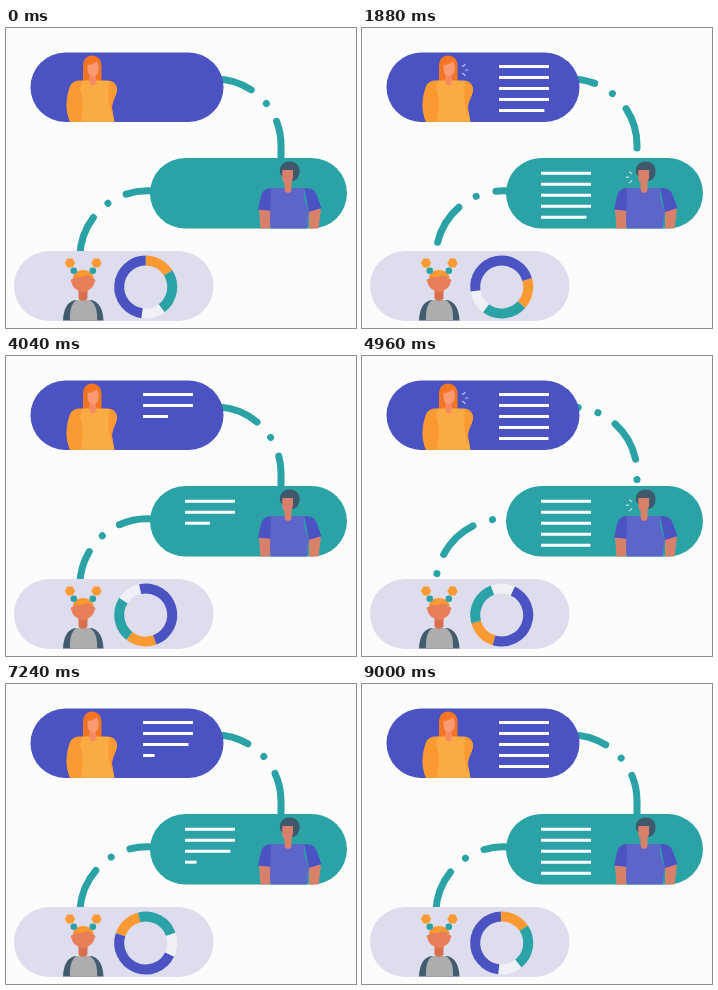
Write an HTML page that moves like this. It is 350 px wide and 300 px high and loops after 9.04 s.

```html
<!DOCTYPE html>
<html lang="en">
<head>
<meta charset="utf-8">
<title>Connected cards</title>
<style>
  html, body { margin: 0; width: 100%; height: 100%; overflow: hidden; background: #fcfcfc; }
  svg { display: block; width: 100vw; height: 100vh; }
  .link { fill: none; stroke: #2ba3a6; stroke-width: 7; stroke-linecap: round; stroke-dasharray: .01 20.4 41.5 20.4; }
  .line { stroke: #fff; stroke-width: 3; }
  .voice { fill: none; stroke-width: 1.2; stroke-linecap: round; }
</style>
</head>
<body>
<svg viewBox="0 0 350 300" xmlns="http://www.w3.org/2000/svg">
  <path class="link" id="upper" d="M197.5 52A66 66 0 0 1 275 117V142"/>
  <path class="link" id="lower" d="M152.7 163.8A67.2 67.2 0 0 0 73.8 230V242"/>

  <rect x="24.5" y="24.5" width="193" height="69.5" rx="34.7" fill="#4b52c1"/>
  <rect x="144" y="130" width="197" height="70.5" rx="35.2" fill="#2ba3a6"/>
  <rect x="8" y="223" width="199.5" height="70" rx="35" fill="#dddded"/>

  <!-- woman, top card -->
  <path fill="#f47521" d="M77 53V38C77 31 81 27.5 86 27.5S95.500 31 95.500 38V53Z"/>
  <path fill="#fb9a33" d="M76 52.500C69 52 65 54 63 61C60 71 59 83 64 94H80Z"/>
  <path fill="#fbab44" d="M76 52.500H101C107 52.500 111 57 111 62C110 69 106 73 106 80C106 85 108 89 108.500 94H75C77 82 78 70 74 61Z"/>
  <path fill="#fb9a33" d="M103 52.700C108 53 111 57 111 62C110 69 106 73 106 80L108 92C103 80 101 68 103 60Z"/>
  <path fill="#f58b62" d="M83.500 45H90V53C90 59 83.500 59 83.500 53Z"/>
  <path fill="#fa9b74" d="M81.500 37C85 37 89 35 91 33.500C92.500 36 93 39 92.500 42C92 46 90 48 87 48C83.500 48 81.500 45 81.500 41Z"/>
  <path class="voice" stroke="#c3c6ee" d="M100.500 38.500L103 36.700M103.500 42H106M100.500 45.300L103 47.300"/>

  <!-- man, middle card -->
  <path fill="#d9806a" d="M253 181L254.500 200.500H264L266 181ZM303 181L303 200.500H312.500L315 181Z"/>
  <path fill="#4b52c1" d="M267 160C260 160 257 162 255 168L252 181.500L266 183ZM298 160C306 160 309 162 311 168L315.500 180L303 184Z"/>
  <path fill="#5b66c8" d="M265 160H299C296 168 300 176 303 184C301 190 301 196 301 200.500H265C264 194 263.500 188 264.500 182Z"/>
  <path fill="#3f586c" d="M274 145C273 138 277 133.500 284 133.500C290 133.500 294 138 293.500 144C293 149 291 152 287 153L275 147Z"/>
  <path fill="#d9806a" d="M276.500 142H287V150L285.500 154V162C285 166 279 166 278.700 162V155.500C276.500 154 276 149 276.500 142Z"/>
  <path class="voice" stroke="#b9dedd" d="M269.700 145.700L267.500 143.800M266.800 149.200H264.300M269.700 152.800L267.500 154.700"/>

  <!-- woman, bottom card -->
  <g fill="#fb9a33">
    <path d="M58.800 235L61.400 230.500H66.600L69.200 235L66.600 239.500H61.400ZM85.300 235L87.900 230.500H93.100L95.700 235L93.100 239.500H87.900Z"/>
    <path d="M67 250C67 245 72 242 77 242S87.500 245 87.500 250L77 256Z"/>
  </g>
  <g fill="#2ba3a6"><circle cx="67.800" cy="242.800" r="3.300"/><circle cx="86.800" cy="242.800" r="3.300"/></g>
  <path fill="#425b6f" d="M57 292.500C57.500 281 61 274 69 272H85.500C93 274 97 281 97.500 292.500Z"/>
  <path fill="#adadae" d="M70 272H84C90 276 91.500 284 91 292.500H64C63.500 284 65 276 70 272Z"/>
  <path fill="#d96f4e" d="M72.500 260H81.500V270C81 273.500 73 273.500 72.500 270Z"/>
  <path fill="#e97f58" d="M64.500 252L70 248.500C74 250 80 248 82 247L89.500 252L87 258.500C84 262 80 264 77 264S70 262 67 258.500Z"/>

  <g id="donut" fill="none" stroke-width="10"></g>
  <g id="lines"></g>
</svg>
<script>
const STEP = 40, LOOP = 9040, CYCLE = 75, STEPS = 225;
const $ = id => document.getElementById(id);

function add(parent, tag, attrs) {
  const el = document.createElementNS("http://www.w3.org/2000/svg", tag);
  for (const key in attrs) el.setAttribute(key, attrs[key]);
  parent.append(el);
  return el;
}

const CENTER = [139.7, 259], RADIUS = 26.5;
function ringPoint(deg) {
  const a = deg * Math.PI / 180;
  return `${CENTER[0] + RADIUS * Math.sin(a)} ${CENTER[1] - RADIUS * Math.cos(a)}`;
}
[[0, 58, "#fb9a33"], [58, 143, "#2ba3a6"], [143, 188, "#f0f1f6"], [188, 360, "#4b52c1"]]
  .forEach(([from, to, stroke]) => add($("donut"), "path", {
    d: `M${ringPoint(from)}A${RADIUS} ${RADIUS} 0 0 1 ${ringPoint(to)}`, stroke
  }));

// Two blocks of five text bars, written one after another.
const bars = [];
for (const [x, top] of [[137, 38.5], [179, 145.2]]) {
  for (let row = 0; row < 5; row++) {
    const y = top + row * 11;
    bars.push({ x, row, el: add($("lines"), "line", { class: "line", x1: x, x2: x, y1: y, y2: y }) });
  }
}

const clamp = v => Math.max(0, Math.min(1, v));
const smooth = v => v * v * (3 - 2 * v);
const voices = document.querySelectorAll(".voice");

// Short pulse: fade in, hold, fade out.
const pulse = p => p < 0 ? 0 : clamp(Math.min(p / 5, (20 - p) / 5));

function draw(time) {
  const slot = Math.floor((time % LOOP) / STEP);
  const n = slot < 2 ? STEPS : slot - 1;
  const phase = n % CYCLE;

  $("donut").setAttribute("transform", `rotate(${n / STEPS * 360} ${CENTER})`);

  const travel = (n - 46) * 1.918;
  $("upper").style.strokeDashoffset = -(56.2 + travel);
  $("lower").style.strokeDashoffset = -(39.3 + travel);

  for (const { x, row, el } of bars) {
    const grown = smooth(clamp((phase - 1 - row * 8) / 16));
    el.setAttribute("x2", x + 50 * grown);
  }

  const opacity = Math.max(pulse(phase), pulse(phase - 37));
  voices.forEach(el => el.style.opacity = opacity);
}

const start = performance.now();
function tick() {
  draw(performance.now() - start);
  requestAnimationFrame(tick);
}
tick();
</script>
</body>
</html>
```
